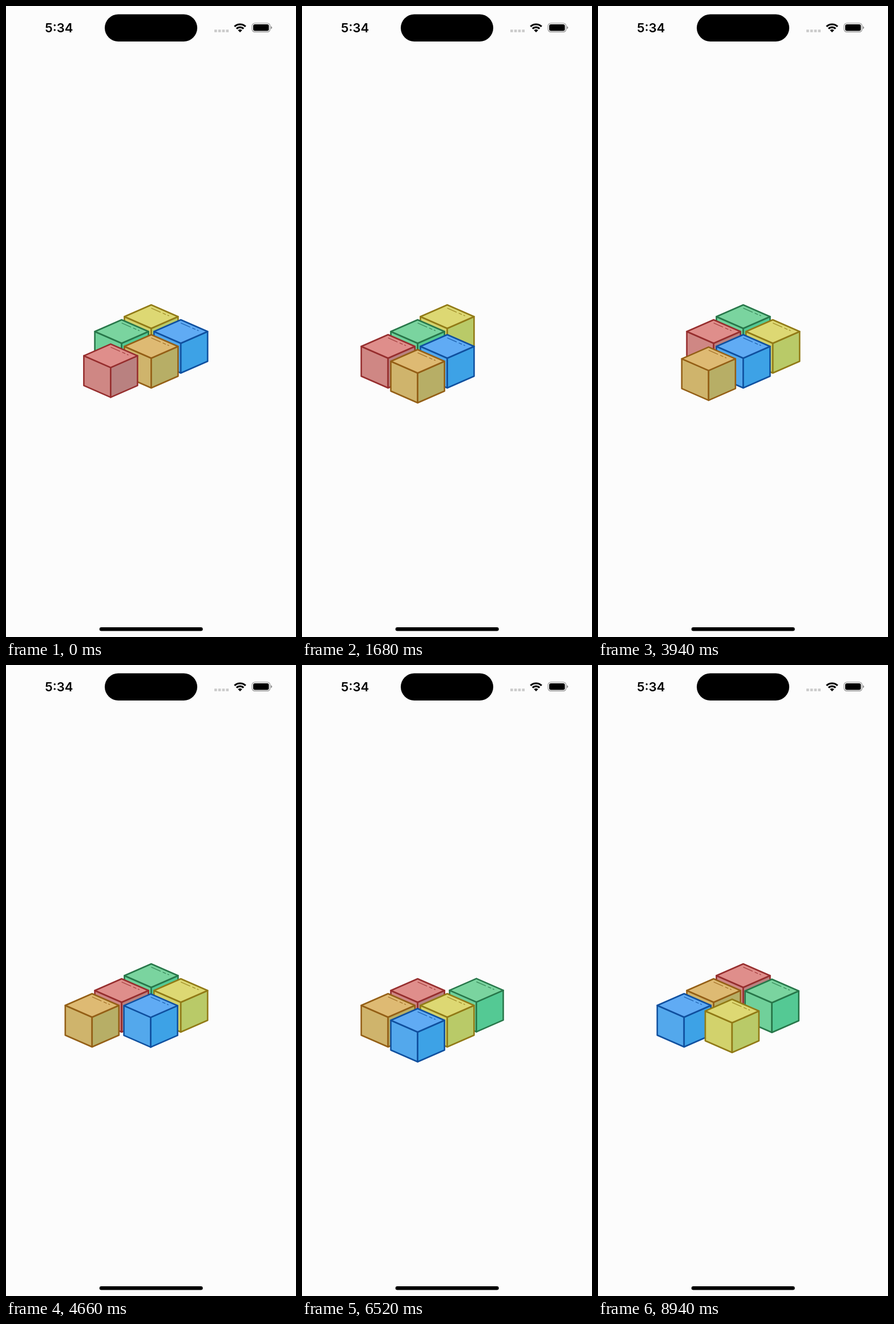
An HTML page that plays this animation: 508x1102 px, repeating every 8.96 s.

```html
<!DOCTYPE html>
<html lang="en">
<head>
<meta charset="utf-8">
<title>Cube loader</title>
<style>
html, body { margin: 0; height: 100%; overflow: hidden; background: #fcfcfc; }
svg { display: block; }
.time { font: 600 22px Inter, sans-serif; text-anchor: middle; }
.cube { stroke-width: 2.6; stroke-linejoin: round; }
.shine { fill: none; stroke-width: 1.4; stroke-dasharray: 18 4 6 3 3 3; opacity: .75; }
</style>
</head>
<body>
<svg width="508" height="1102" viewBox="0 0 508 1102">
  <text class="time" x="92.8" y="46">5:34</text>
  <rect x="173" y="14.5" width="162" height="47.5" rx="23.7"/>
  <path d="M365 43.5h25" stroke="#cacaca" stroke-width="4.6" stroke-dasharray="4.6 2.2"/>
  <g fill="none" stroke="#000" stroke-width="3.1">
    <path d="M400.3 35.8A14.2 14.2 0 0 1 419.7 35.8"/>
    <path d="M403.8 39.6A9 9 0 0 1 416.2 39.6"/>
  </g>
  <path d="M410 46l-3.7-3.8a5.3 5.3 0 0 1 7.4 0z"/>
  <rect x="431" y="30" width="31.6" height="15.4" rx="4.8" fill="none" stroke="#8c8c8c" stroke-width="1.1"/>
  <rect x="433" y="32" width="27.5" height="11.5" rx="3"/>
  <path d="M464 35.2q2.2 .8 2.2 2.5t-2.2 2.5z" fill="#8c8c8c"/>
  <rect x="163.7" y="1085" width="181" height="6.6" rx="3.3"/>
  <g id="stack"></g>
</svg>
<script>
// Ring of six slots: [x, y] of each cube's top corner
const SLOTS = [[202.6, 600], [150.8, 574], [202.6, 548], [254.4, 522], [306.2, 548], [254.4, 574]];
// Moment within a cycle when the cube in each slot moves to the next slot
const STARTS = [0, 67.5, 63, 45, 25.5, 19.7];
const HOMES = [0, 2, 3, 4, 5];
const MOVE = 19, CYCLE = 87.62, OFFSET = 8.06;
const FRAMES = 196, LOOP = 8960;

// Colours: top, left, right, line; in order of HOMES
const COLORS = [
  ['#df8e8b', '#cf8784', '#b98180', '#962e2e'],
  ['#7ad49f', '#70d09a', '#54c994', '#28774a'],
  ['#ddd873', '#d2d26c', '#b9ca68', '#917a16'],
  ['#60abf4', '#53a8ec', '#3da2e6', '#10509f'],
  ['#deba73', '#cfb46c', '#b7ae66', '#945f16']
];

const stack = document.getElementById('stack');
const cubes = COLORS.map(([top, left, right, line]) => {
  const g = document.createElementNS('http://www.w3.org/2000/svg', 'g');
  g.setAttribute('class', 'cube');
  g.setAttribute('stroke', line);
  g.innerHTML = `
    <path fill="${left}" d="M-47 20.5L0 41V93L-47 72.5z"/>
    <path fill="${right}" d="M47 20.5L0 41V93L47 72.5z"/>
    <path fill="${top}" d="M0 0L47 20.5L0 41L-47 20.5z"/>
    <path class="shine" d="M0 5.6L34 20.4"/>`;
  return g;
});

// Steps last 20 ms, with a 100 ms hold about every third one
const ticks = i => Math.floor(i * 1.675 + .44);
const times = [0];
for (let i = 0; i < FRAMES - 1; i++)
  times.push(times[i] + (ticks(i + 1) - ticks(i) > 1 ? 20 : 100));

// Cubic bezier (.42, 0, .58, 1)
function ease(x) {
  if (x <= 0) return 0;
  if (x >= 1) return 1;
  let lo = 0, hi = 1;
  for (let i = 0; i < 20; i++) {
    const s = (lo + hi) / 2, r = 1 - s;
    if (1.26 * r * r * s + 1.74 * r * s * s + s * s * s < x) lo = s; else hi = s;
  }
  return lo * lo * (3 - 2 * lo);
}

function place(j, n) {
  const cycle = Math.floor(n / CYCLE), u = n - cycle * CYCLE;
  const home = HOMES[(j + cycle) % 5];
  const step = slot => ease((u - STARTS[slot]) / MOVE);
  const ring = home + step(home) + (home ? 0 : step(1));
  const i = Math.floor(ring), f = ring - i;
  const a = SLOTS[i % 6], b = SLOTS[(i + 1) % 6];
  return a.map((v, k) => v + (b[k] - v) * f);
}

let shown = -1;
function draw(now) {
  const t = now % LOOP;
  let frame = FRAMES - 1;
  while (times[frame] > t) frame--;
  if (frame !== shown) {
    shown = frame;
    cubes.map((g, j) => ({ g, p: place(j, frame + OFFSET) }))
      .sort((a, b) => a.p[1] - b.p[1])
      .forEach(({ g, p }) => {
        g.setAttribute('transform', `translate(${p})`);
        stack.append(g);
      });
  }
  requestAnimationFrame(() => draw(performance.now() - began));
}
const began = performance.now();
draw(0);
</script>
</body>
</html>
```
